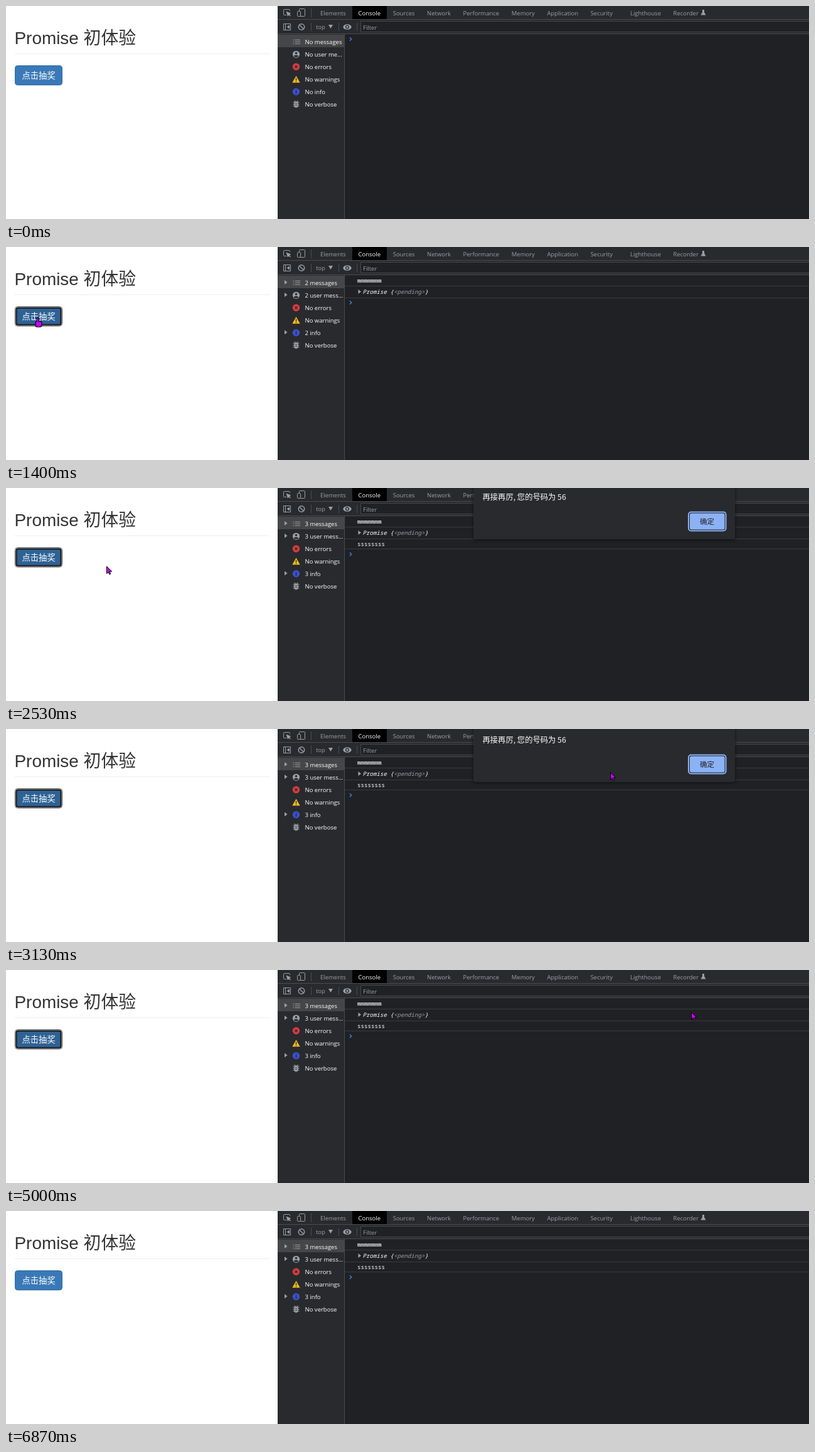
Write an HTML page with a canvas that moves like this. It is 1280 px wide and 341 px high and loops after 7070 ms.

```html
<!DOCTYPE html>
<html lang="zh">
<head>
<meta charset="utf-8">
<title>Promise 初体验</title>
<style>
html, body { margin: 0; width: 100%; height: 100%; overflow: hidden; background: #fff; }
canvas { display: block; width: 100vw; height: 100vh; }
</style>
</head>
<body>
<canvas id="stage" width="1280" height="341"></canvas>
<script>
const ctx = document.getElementById('stage').getContext('2d', { alpha: false });
const LOOP = 7070, FPS = 15;
const CJK = '"Noto Sans CJK SC", "Noto Sans CJK JP", "Noto Sans CJK", sans-serif';
const UI = '9.5px "Open Sans", "Noto Sans", sans-serif';
const MONO = '9.17px "Noto Sans Mono", "DejaVu Sans Mono", monospace';
const CELL = 5.5;
const GREY = '#9aa0a6', PANEL = '#292a2d', BACK = '#202124', RULE = '#494c50', LINE = '#3a3b3e';
const LEFT = 433, SPLIT = 539;

// Ticks (1/15 s) at which the state changes
const ENTER = 1, FOCUS = 19, LOGGED = 21, RESOLVED = 37, CLOSING = 68, CLOSED = 71, LEAVE = 84, BLUR = 103;

// Eased pointer moves: when each begins and ends, and where it goes
const START = { x: 1290, y: 338 };
const MOVES = [
  { from: 0, to: 11, x: 159, y: 170 },
  { from: 12, to: 18, x: 50, y: 113 },
  { from: 29, to: 33, x: 129, y: 120 },
  { from: 35, to: 38, x: 160, y: 125 },
  { from: 38, to: 47, x: 963, y: 69 },
  { from: 47, to: 59, x: 1114, y: 60 },
  { from: 74, to: 84.5, x: 270, y: 330 }
];

const clamp = u => Math.min(1, Math.max(0, u));
const ease = u => u * u * (3 - 2 * u);

function pointerAt(tick) {
  if (tick < ENTER || tick >= LEAVE) return null;
  let { x, y } = START;
  for (const m of MOVES) {
    const u = ease(clamp((tick - m.from) / (m.to - m.from)));
    x += (m.x - x) * u;
    y += (m.y - y) * u;
  }
  return { x, y };
}

const inside = (p, x, y, w, h) => p && p.x >= x && p.x < x + w && p.y >= y && p.y < y + h;

function rect(x, y, w, h, color) {
  ctx.fillStyle = color;
  ctx.fillRect(x, y, w, h);
}

function paint(fill, stroke, width = 1) {
  if (fill) { ctx.fillStyle = fill; ctx.fill(); }
  if (stroke) { ctx.strokeStyle = stroke; ctx.lineWidth = width; ctx.stroke(); }
}

function box(x, y, w, h, r, fill, stroke, width) {
  ctx.beginPath();
  ctx.roundRect(x, y, w, h, r);
  paint(fill, stroke, width);
}

function poly(points, fill, stroke, width) {
  ctx.beginPath();
  for (let i = 0; i < points.length; i += 2) ctx.lineTo(points[i], points[i + 1]);
  ctx.closePath();
  paint(fill, stroke, width);
}

function line(x1, y1, x2, y2, color, width) {
  ctx.beginPath();
  ctx.moveTo(x1, y1);
  ctx.lineTo(x2, y2);
  paint(null, color, width);
}

function oval(x, y, rx, ry, fill, stroke, width) {
  ctx.beginPath();
  ctx.ellipse(x, y, rx, ry, 0, 0, Math.PI * 2);
  paint(fill, stroke, width);
}

const disc = (x, y, r, fill, stroke, width) => oval(x, y, r, r, fill, stroke, width);
const arrowRight = (x, y) => poly([x, y - 3.5, x, y + 3.5, x + 4.5, y], GREY);

// Draws a string and returns the x where it ends
function text(str, x, y, font, color) {
  ctx.font = font;
  ctx.fillStyle = color;
  ctx.fillText(str, x, y);
  return x + ctx.measureText(str).width;
}

function drawPage(tick, pointer) {
  rect(0, 0, LEFT, 341, '#fff');
  text('Promise 初体验', 13.5, 61, '27.9px "Liberation Sans", Arial, ' + CJK, '#333');
  rect(14, 76, 406, 1, '#eee');

  const hover = inside(pointer, 14, 95, 76, 32);
  const fill = hover ? '#2e6294' : '#3a79b7';
  if (tick >= FOCUS && tick < BLUR) {
    box(14.5, 95.5, 75, 31, 4, '#fff', '#4a4a4a');
    box(16.5, 97.5, 71, 27, 2.5, '#2e6294', '#101010', 2);
  } else {
    box(14.5, 95.5, 75, 31, 4, fill, '#2e6da4');
  }
  text('点击抽奖', 25.5, 116, '13.3px ' + CJK, '#fff');
}

function drawTabs(x, labels) {
  for (const label of labels) {
    const active = label === 'Console';
    if (active) rect(552, 0, 55, 21, '#000');
    x = text(label, x, 15, UI, active ? '#fff' : GREY) + 19.6;
  }
}

function drawToolbars() {
  rect(LEFT, 0, 847, 341, BACK);
  rect(LEFT, 0, 847, 44, PANEL);
  rect(LEFT, 21, 847, 1, RULE);
  rect(LEFT, 44, 847, 1, RULE);
  drawTabs(501, ['Elements', 'Console', 'Sources', 'Network', 'Performance', 'Memory', 'Application', 'Security']);
  drawTabs(995, ['Lighthouse', 'Recorder']);
  rect(1110, 6, 3, 5, GREY);
  poly([1111.5, 7, 1115.5, 14.5, 1107.5, 14.5], GREY);

  // Inspect and device icons
  box(442.5, 5.5, 10, 9, 1, null, GREY);
  rect(447, 8, 7, 8, PANEL);
  poly([446.5, 8.5, 454, 11.5, 449, 16.5], GREY);
  line(450, 12, 453.5, 16, GREY, 1.4);
  box(467.5, 4.5, 9, 12, 1, null, GREY);
  box(464.5, 8.5, 5, 8, 1, PANEL, GREY);
  rect(486, 4, 1, 14, RULE);

  // Console controls
  box(442.5, 28.5, 11, 10, 0, null, GREY);
  rect(445, 29, 1, 9, GREY);
  poly([452, 30.5, 452, 36.5, 447.5, 33.5], GREY);
  disc(471, 33.5, 4.7, null, GREY, 1.5);
  line(467.7, 30.2, 474.3, 36.8, GREY, 1.5);
  for (const x of [486, 530, 559]) rect(x, 27, 1, 13, RULE);
  text('top', 494, 37, UI, GREY);
  poly([514, 30, 521, 30, 517.5, 36], GREY);
  oval(544, 33.5, 6.6, 4.3, GREY);
  disc(544, 33.5, 2.4, GREY, PANEL, 1.3);
  box(565.5, 24.5, 718, 17, 0, BACK, '#45484c');
  text('Filter', 569, 37.5, UI, GREY);
}

function drawRows(x, y, w) {
  for (const dy of [-3, 0, 3]) rect(x, y + dy - 0.5, w, 1, GREY);
}

const ICONS = {
  list(x, y) {
    drawRows(x - 5, y, 1.5);
    drawRows(x - 2, y, 8.5);
  },
  user(x, y) {
    disc(x, y, 5.6, GREY);
    disc(x, y - 1.8, 1.8, PANEL);
    oval(x, y + 3, 3.4, 1.7, PANEL);
  },
  error(x, y) {
    disc(x, y, 5.7, '#dc3b41');
    for (const d of [-2, 2]) line(x - 2, y - d, x + 2, y + d, PANEL, 1.3);
  },
  warning(x, y) {
    poly([x, y - 5.5, x + 6.2, y + 5.5, x - 6.2, y + 5.5], '#f2bd1d');
    rect(x - 0.7, y - 2, 1.4, 4, PANEL);
    rect(x - 0.7, y + 3, 1.4, 1.4, PANEL);
  },
  info(x, y) {
    disc(x, y, 5.7, '#3b50cf');
    rect(x - 0.7, y - 3, 1.4, 1.4, BACK);
    rect(x - 0.7, y - 1, 1.4, 4, BACK);
  },
  bug(x, y) {
    drawRows(x - 5, y, 10);
    for (const d of [-3, 3]) line(x + d, y - 5.5, x, y - 3, GREY, 1.2);
    box(x - 3.2, y - 4.2, 6.4, 9.6, 3.2, GREY);
    for (const d of [-1.5, 1.2]) rect(x - 1.3, y + d, 2.6, 1, PANEL);
  }
};

function drawSidebar(count) {
  rect(LEFT, 45, SPLIT - LEFT, 296, PANEL);
  rect(LEFT, 46, SPLIT - LEFT, 20, '#454648');
  rect(SPLIT, 45, 1, 296, RULE);
  const n = count || 'No';
  const rows = [
    ['list', n + ' messages', true],
    ['user', count ? n + ' user mess...' : 'No user me...', true],
    ['error', 'No errors'],
    ['warning', 'No warnings'],
    ['info', n + ' info', true],
    ['bug', 'No verbose']
  ];
  rows.forEach(([icon, label, counted], i) => {
    const y = 57 + i * 20;
    ICONS[icon](462.5, y + 0.3);
    text(label, 476.5, y + 4, UI, '#fff');
    if (count && counted) arrowRight(444, y - 0.5);
  });
}

function drawConsole(count) {
  let prompt = 53;
  if (count) {
    for (let i = 0; i < 7; i++) {
      text('m', 560 + i * CELL, 57, 'bold ' + MONO, i % 2 ? '#c5d3e6' : '#e2d9cc');
    }
    rect(SPLIT + 1, 62, 740, 1, LINE);
    arrowRight(561.5, 71.5);
    const oblique = 'italic ' + MONO;
    let x = text('Promise {', 568.5, 75, oblique, '#fff');
    x = text('<pending>', x, 75, oblique, GREY);
    text('}', x, 75, oblique, '#fff');
    rect(SPLIT + 1, 81, 740, 1, LINE);
    prompt = 89;
  }
  if (count > 2) {
    text('ssssssss', 560, 93, MONO, '#fff');
    rect(SPLIT + 1, 97, 740, 1, LINE);
    prompt = 106;
  }
  for (const d of [-2.8, 2.8]) line(547.8, prompt + d, 551, prompt, '#3f7de0', 1.5);
}

function drawDialog(tick, pointer) {
  if (tick < RESOLVED || tick >= CLOSED) return;
  const opening = clamp((tick - RESOLVED + 1) / 3);
  const closing = clamp((tick - CLOSING + 1) / 4);
  const hover = inside(pointer, 1088, 41, 60, 31);
  ctx.save();
  ctx.globalAlpha = clamp(opening * 1.5) * (1 - closing);
  ctx.translate(0, -Math.round(9 * (1 - opening) + 3 * closing));
  ctx.shadowColor = 'rgba(0,0,0,.6)';
  ctx.shadowBlur = 5;
  ctx.shadowOffsetY = 1;
  box(745, -20, 417, 105, 4, PANEL);
  ctx.shadowColor = 'transparent';
  text('再接再厉, 您的号码为 56', 759.5, 21.5, '12.3px ' + CJK, '#fff');
  box(1088, 41.5, 59.5, 30, 4, BACK, hover ? '#83a3e6' : '#8ab0f3', 2);
  box(1090, 43.5, 55.5, 26, 2.5, hover ? '#88a5e5' : '#8cb2f6');
  text('确定', 1106, 61, '11.5px ' + CJK, BACK);
  ctx.restore();
}

function drawHand() {
  for (const [color, grow] of [['#000', 1], ['#c400ff', 0]]) {
    box(-1 - grow, -grow, 2 + grow * 2, 9 + grow * 2, 1, color);
    box(-3 - grow, 6 - grow, 9 + grow * 2, 8 + grow * 2, 3, color);
  }
}

function drawPointer(pointer) {
  if (!pointer) return;
  ctx.save();
  ctx.translate(Math.round(pointer.x) + 0.5, Math.round(pointer.y) + 0.5);
  if (inside(pointer, 14, 95, 76, 32)) drawHand();
  else poly([0, 0, 0, 11.5, 2.6, 9.2, 4.5, 13, 6.3, 12, 4.7, 8.4, 8.2, 8.2], '#c400ff', '#000');
  ctx.restore();
}

function draw(ms) {
  const tick = Math.floor((ms % LOOP + 4) * FPS / 1000);
  const pointer = pointerAt(tick);
  const count = tick >= RESOLVED ? 3 : tick >= LOGGED ? 2 : 0;
  drawPage(tick, pointer);
  drawToolbars();
  drawSidebar(count);
  drawConsole(count);
  drawDialog(tick, pointer);
  drawPointer(pointer);
}

let start;
function loop(now) {
  start ??= now;
  draw(now - start);
  requestAnimationFrame(loop);
}
draw(0);
requestAnimationFrame(loop);
</script>
</body>
</html>
```
